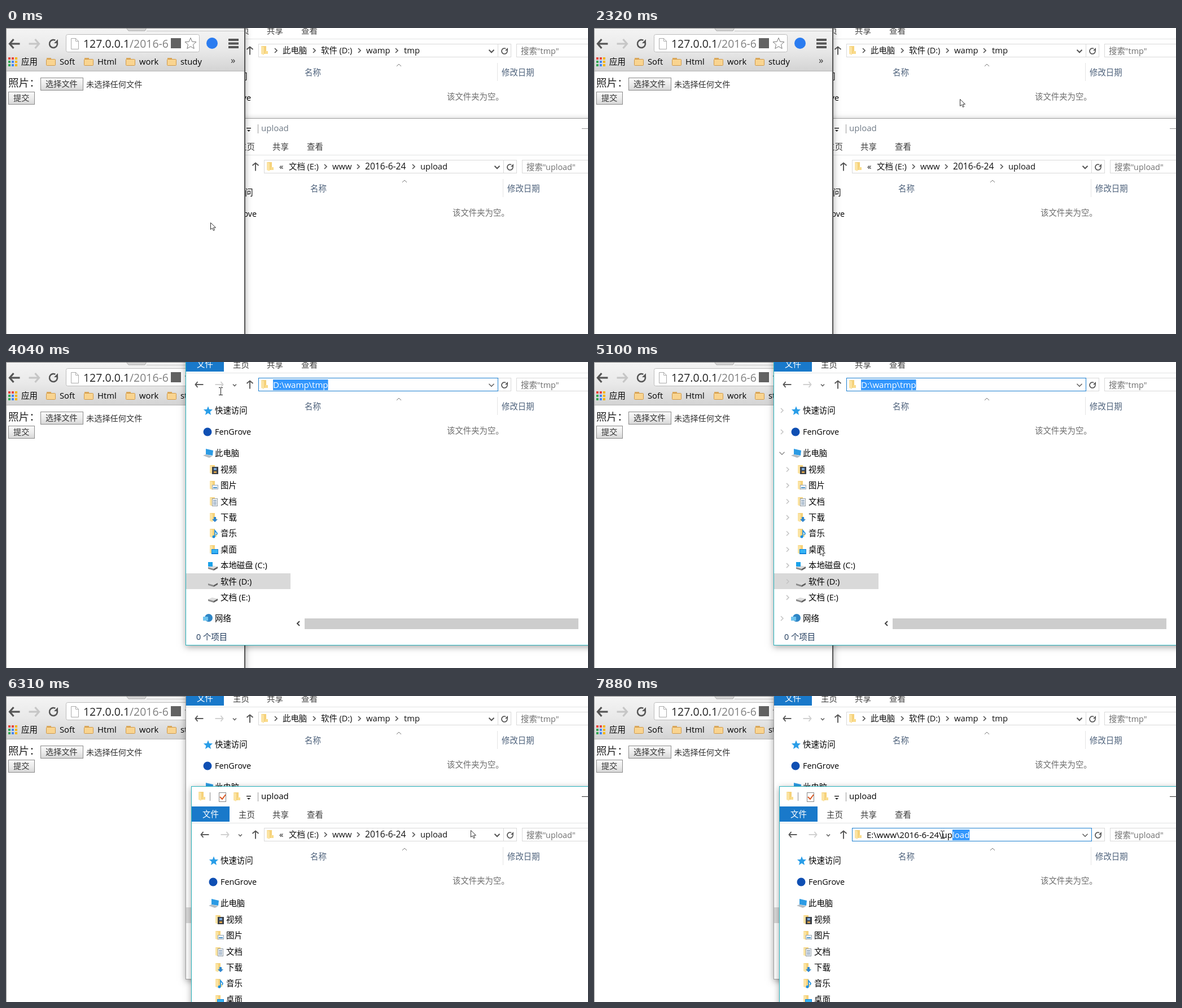
Write an HTML page with a canvas that moves like this. It is 1031 px wide and 543 px high and loops after 8000 ms.

```html
<!DOCTYPE html>
<html lang="zh">
<head>
<meta charset="utf-8">
<title>Upload folders</title>
<style>
html, body { margin: 0; width: 100%; height: 100%; overflow: hidden; background: #fff; }
canvas { display: block; }
</style>
</head>
<body>
<canvas id="stage" width="1031" height="543"></canvas>
<script>
const c = document.getElementById('stage').getContext('2d');
const LOOP = 8000, STEP = 120;
const FONT = '"Open Sans", "Noto Sans CJK SC", "Noto Sans CJK", sans-serif';

// Pointer moves: start time, number of steps, end x, end y
const MOVES = [
  [120, 6, 308, 214], [840, 1, 304, 246], [990, 3, 449, 190], [1350, 2, 362, 155],
  [1630, 1, 645, 198], [1780, 2, 685, 159], [2050, 1, 620, 110], [2200, 2, 648, 126],
  [2720, 2, 753, 40], [2980, 1, 758, 30], [3100, 1, 767, 34], [3250, 1, 785, 38],
  [3680, 4, 380, 52], [4590, 4, 281, 120], [5100, 1, 400, 330], [5260, 1, 537, 452],
  [5410, 2, 612, 526], [5650, 2, 636, 428], [5920, 2, 731, 226], [6190, 2, 823, 238],
  [6580, 1, 821, 245], [6950, 1, 781, 245], [7100, 4, 402, 252], [7610, 2, 676, 247],
  [7880, 1, 617, 246]
];

function pointer(t) {
  let x = 362, y = 345;
  for (const [start, n, ex, ey] of MOVES) {
    if (t < start) break;
    const k = Math.min(n, Math.floor((t - start) / STEP) + 1) / n;
    x += (ex - x) * k;
    y += (ey - y) * k;
  }
  return [Math.round(x), Math.round(y)];
}

function rect(x, y, w, h, fill) {
  c.fillStyle = fill;
  c.fillRect(x, y, w, h);
}
function frame(x, y, w, h, color) {
  c.strokeStyle = color;
  c.lineWidth = 1;
  c.strokeRect(x + .5, y + .5, w - 1, h - 1);
}
function line(points, color, width = 1.5) {
  c.beginPath();
  for (let i = 0; i < points.length; i += 2) c.lineTo(points[i], points[i + 1]);
  c.strokeStyle = color;
  c.lineWidth = width;
  c.stroke();
}
function poly(points, fill, stroke) {
  c.beginPath();
  for (let i = 0; i < points.length; i += 2) c.lineTo(points[i], points[i + 1]);
  c.closePath();
  if (fill) { c.fillStyle = fill; c.fill(); }
  if (stroke) { c.strokeStyle = stroke; c.lineWidth = 1; c.stroke(); }
}
function dot(x, y, r, fill) {
  c.beginPath();
  c.arc(x, y, r, 0, 7);
  c.fillStyle = fill;
  c.fill();
}
function setFont(size, weight = 400) { c.font = `${weight} ${size}px ${FONT}`; }
// y is the middle of the line
function text(s, x, y, color = '#000', size, weight) {
  setFont(size || (/[\u4e00-\u9fff]/.test(s) ? 14.4 : 14.8), weight);
  c.fillStyle = color;
  c.fillText(s, x, y + 5);
}
function chevron(x, y, dir, size, color, width = 1.5) {
  c.save();
  c.translate(x, y);
  c.rotate({ right: 0, down: 1, left: 2, up: 3 }[dir] * Math.PI / 2);
  line([-size / 2, -size, size / 2, 0, -size / 2, size], color, width);
  c.restore();
}
function arrow(x, y, len, head, color, width, turn = 0) {
  c.save();
  c.translate(x, y);
  c.rotate(turn);
  line([-len / 2 + 1, 0, len / 2, 0], color, width);
  line([head - len / 2, -head, -len / 2 + 1, 0, head - len / 2, head], color, width);
  c.restore();
}
function star(x, y, r, fill, stroke) {
  const p = [];
  for (let i = 0; i < 10; i++) {
    const a = i * Math.PI / 5, q = i % 2 ? r * .45 : r;
    p.push(x + q * Math.sin(a), y - q * Math.cos(a));
  }
  poly(p, fill, stroke);
}
function reload(x, y, r, color, width) {
  c.beginPath();
  c.arc(x, y, r, -.2, 5.2);
  c.strokeStyle = color;
  c.lineWidth = width;
  c.stroke();
  poly([x + r + 1, y - r - 1, x + r + 1, y - 1, x + 1, y - 1], color);
}
function folder(x, y) {
  rect(x, y, 9, 14, '#f6d27a');
  poly([x, y, x + 5, y + 2, x + 5, y + 16, x, y + 14], '#fbe3a2');
  rect(x + 7, y + 9, 5, 5, '#f9dc8d');
}
function bookmark(x) {
  rect(x + 1, 53, 8, 4, '#dba95c');
  c.beginPath();
  c.roundRect(x + .5, 55.5, 16, 11, 1);
  c.fillStyle = '#f9d490';
  c.fill();
  c.strokeStyle = '#cf9a4c';
  c.lineWidth = 1;
  c.stroke();
}
function vertical(y0, y1, ...stops) {
  const g = c.createLinearGradient(0, y0, 0, y1);
  stops.forEach((s, i) => g.addColorStop(i / (stops.length - 1), s));
  return g;
}
function panel(x, y, w, h, border) {
  c.save();
  c.shadowColor = 'rgba(0,0,0,.35)';
  c.shadowBlur = 11;
  c.shadowOffsetY = 3;
  rect(x, y, w, h, '#fff');
  c.restore();
  frame(x, y, w, h, border);
}

function button(s, x, y, w) {
  rect(x, y, w, 23, vertical(y, y + 23, '#fafafa', '#ececec', '#d6d6d6'));
  frame(x, y, w, 23, '#8c8c8c');
  text(s, x + 9, y + 11, '#333', 14.2, 300);
}

function browser() {
  panel(-2, -2, 426, 560, '#505050');
  rect(422, 0, 2, 543, '#555');
  rect(0, 0, 422, 77, vertical(0, 77, '#f4f4f4', '#e9e9e9', '#d3d3d3'));
  poly([213, 0, 217, 5, 246, 5, 249, 0], '#d5d5d5', '#aaa');
  rect(249, 5, 173, 1, '#c8c8c8');
  rect(0, 0, 422, 1, '#858585');
  rect(0, 76, 422, 1, '#b4b4b4');
  rect(0, 0, 1, 543, '#999');

  arrow(15, 28, 19, 8, '#555', 3.2);
  arrow(50, 28, 19, 8, '#c6c6c6', 3.2, Math.PI);
  reload(84, 28, 7, '#555', 2.6);
  c.beginPath();
  c.roundRect(106.5, 11.5, 236, 31, 3);
  c.fillStyle = '#fff';
  c.fill();
  c.strokeStyle = '#bcbcbc';
  c.lineWidth = 1;
  c.stroke();
  poly([115.5, 18.5, 123.5, 18.5, 128.5, 23.5, 128.5, 37.5, 115.5, 37.5], '#fff', '#aaa');
  line([123.5, 18, 123.5, 23.5, 129, 23.5], '#aaa', 1);
  c.save();
  c.beginPath();
  c.rect(130, 12, 159, 30);
  c.clip();
  text('127.0.0.1', 137, 29.5, '#222', 19.4);
  const hostWidth = c.measureText('127.0.0.1').width;
  text('/2016-6', 137 + hostWidth, 29.5, '#808080', 19.4);
  c.restore();
  rect(292, 18, 18, 18, '#626262');
  star(327, 28, 10.5, '#fff', '#777');
  dot(365, 27, 10, '#2b7cf0');
  for (const y of [19, 25.5, 32]) rect(394, y, 18, 4, '#555');

  const hues = ['#e8453c', '#e8453c', '#f5b400', '#34a853', '#4285f4', '#f5b400', '#34a853', '#4285f4', '#f5b400'];
  hues.forEach((h, i) => rect(4 + i % 3 * 6, 52 + Math.floor(i / 3) * 6, 4, 4, h));
  text('应用', 27, 60);
  [['Soft', 71], ['Html', 138], ['work', 212], ['study', 285]].forEach(([s, x]) => {
    bookmark(x);
    text(s, x + 24, 60);
  });
  text('»', 398, 58, '#333', 17);

  text('照片：', 4, 99, '#222', 18.6, 300);
  button('选择文件', 61, 88, 76);
  text('未选择任何文件', 142, 99.5, '#333', 14.2, 300);
  button('提交', 4, 113, 47);
}

// Overlay on a library folder, by row
const BADGES = [
  (x, y) => { rect(x, y - 5, 11, 13, '#3c4148'); rect(x + 3, y - 3, 5, 4, '#7aa7d8'); rect(x + 3, y + 3, 5, 3, '#d6a04b'); },
  (x, y) => { rect(x, y - 1, 11, 8, '#eef5fb'); frame(x, y - 1, 11, 8, '#9aa7b2'); rect(x + 2, y + 3, 7, 2, '#4f94c9'); },
  (x, y) => { rect(x, y - 6, 10, 14, '#fff'); frame(x, y - 6, 10, 14, '#8f9aa3'); for (let i = 0; i < 4; i++) rect(x + 2, y - 3 + i * 2.5, 6, 1, '#55779b'); },
  (x, y) => poly([x + 3, y - 1, x + 7, y - 1, x + 7, y + 3, x + 10, y + 3, x + 5, y + 8, x, y + 3, x + 3, y + 3], '#2f86d1'),
  (x, y) => { dot(x + 3, y + 6, 2.5, '#1d8fe0'); line([x + 5, y + 6, x + 5, y - 5, x + 9, y, x + 8, y + 3], '#1d8fe0', 1.7); },
  (x, y) => { rect(x - 1, y - 1, 12, 9, '#1283d8'); rect(x, y, 10, 6, '#35b4f5'); }
];

function drive(y) {
  poly([358, y + 3, 365, y, 375, y + 2, 368, y + 6], '#dcdcdc');
  poly([358, y + 3, 368, y + 6, 368, y + 9, 358, y + 6], '#8b8b8b');
  poly([368, y + 6, 375, y + 2, 375, y + 5, 368, y + 9], '#5c5c5c');
}

function tree(win, open) {
  if (!win.upload) rect(319, 375, 185, 28, '#d9d9d9');
  star(358, 87, 8.5, '#2a9ee8');
  dot(357, 124, 7.5, '#0f4fb3');
  poly([354, 154, 367, 157, 366, 166, 354, 164], '#2c9be4');
  poly([349, 166, 354, 164, 366, 167, 360, 170], '#b5bcc2');
  dot(359, 454, 7, '#2f86c6');
  rect(349, 452, 9, 7, '#6fc4ef');
  text('快速访问', 370, 86);
  text('FenGrove', 370, 124, '#000', 14.4);
  text('此电脑', 370, 162);
  text('网络', 370, 455);
  const names = ['视频', '图片', '文档', '下载', '音乐', '桌面', '本地磁盘 (C:)', '软件 (D:)', '文档 (E:)'];
  names.forEach((s, i) => {
    const y = 190.7 + 28.4 * i, iy = Math.round(y);
    if (i < 6) {
      folder(361, iy - 8);
      BADGES[i](365, iy);
    } else drive(iy);
    text(s, 380, y);
    if (open) chevron(343, y, 'right', 4, '#c4c4c4');
  });
  rect(358, 355, 8, 8, '#1aa2ea');
  if (open) {
    for (const y of [86, 124, 455]) chevron(333, y, 'right', 4, '#c4c4c4');
    chevron(333, 162, 'down', 4.5, '#8f8f8f');
  }
}

function address(win) {
  const border = win.edit ? '#1c7fd0' : win.hover ? '#7eb4ea' : '#d9d9d9';
  frame(871, 28, 24, 24, '#d9d9d9');
  frame(447, 28, 425, 24, border);
  folder(452, 32);
  if (win.edit) {
    const size = 15, x = 473, s = win.path;
    setFont(size);
    const width = n => c.measureText(s.slice(0, n)).width;
    let from = 0;
    if (win.keep) from = s.length - win.keep;
    else while (from < s.length && x + (width(from) + width(from + 1)) / 2 < win.selX) from++;
    text(s.slice(0, from), x, 40.5, '#000', size);
    const left = x + width(from);
    if (from < s.length) rect(left, 31, width(s.length) - width(from), 19, '#3397fd');
    text(s.slice(from), left, 40.5, '#fff', size);
  } else {
    win.crumbs.forEach(([s, cx]) => text(s, cx, 40, '#111', /^\d/.test(s) ? 15.6 : 0));
    win.marks.forEach(mx => chevron(mx, 40, 'right', 4, '#555', 1.7));
  }
  chevron(860, 41, 'down', 4.5, '#555', win.edit ? 1.3 : 2);
  reload(883, 41, 5, '#555', 1.7);
}

function explorer(win) {
  c.save();
  c.translate(win.dx, win.dy);
  panel(318, -46, 760, 549, win.active ? '#27b3bd' : '#a0a0a0');

  folder(331, -36);
  rect(351, -35, 1, 15, '#8a8a8a');
  rect(367, -35, 13, 16, '#fff');
  frame(367, -35, 13, 17, '#888');
  line([369, -27, 373, -23, 379, -31], '#d9541e', 2);
  folder(393, -35);
  rect(416, -29, 8, 1.5, '#222');
  poly([417, -25, 423, -25, 420, -22], '#222');
  rect(436, -35, 1, 16, '#999');
  text(win.name, 442, -28, win.active ? '#000' : '#6f7a86', 15);
  rect(1010, -28, 30, 1, win.active ? '#333' : '#999');

  rect(319, -10, 67, 27, '#1979ca');
  text('文件', 338, 4, '#fff');
  [['主页', 402], ['共享', 462], ['查看', 523]].forEach(([s, x]) => text(s, x, 4.5, '#3a3a3a'));
  rect(319, 19, 760, 1, '#e2e3e4');

  arrow(342, 40, 15, 5, '#555', 1.9);
  arrow(378, 40, 15, 5, '#cfcfcf', 1.9, Math.PI);
  chevron(405, 41, 'down', 3, '#666', 1.6);
  arrow(432, 40, 15, 5.5, '#555', 1.9, Math.PI / 2);
  address(win);
  frame(904, 28, 200, 24, '#d9d9d9');
  text(`搜索"${win.name}"`, 912, 40.5, '#707070');

  text('名称', 529, 78.5, '#4c607a');
  text('修改日期', 878, 78.5, '#4c607a');
  chevron(696, 66, 'up', 4, '#777', 1);
  rect(870, 62, 1, 32, '#e4e4e4');
  text('该文件夹为空。', 781, 122, '#6d6d6d');
  tree(win, win.open);
  chevron(518, 464, 'left', 4, '#444', 2);
  rect(529, 455, 485, 19, win.scroll ? '#b9b9b9' : '#cdcdcd');
  text('0 个项目', 337, 488, '#1e395b');
  c.restore();
}

function cursor(x, y, beam) {
  if (beam) {
    const ink = '#222';
    rect(x, y - 6, 1, 13, ink);
    for (const e of [-7, 6]) {
      rect(x - 3, y + e, 3, 1, ink);
      rect(x + 1, y + e, 3, 1, ink);
    }
  } else {
    const p = [0, 0, 0, 12, 3, 9.5, 5, 14, 7, 13, 5, 8.7, 9, 8.7];
    poly(p.map((v, i) => v + .5 + (i % 2 ? y : x)), '#fff', '#333');
  }
}

function draw(t) {
  const [x, y] = pointer(t);
  const tmpUp = t >= 2600, uploadUp = t >= 5650;
  const tmp = {
    dx: 0, dy: 0, name: 'tmp', path: 'D:\\wamp\\tmp',
    active: tmpUp && !uploadUp,
    hover: t >= 2980 && t < 3100,
    edit: t >= 3100 && !uploadUp,
    selX: t < 3400 || t > 4040 ? 0 : t < 3680 ? 999 : x,
    open: t >= 4710 && !uploadUp,
    scroll: t >= 5260 && !uploadUp,
    crumbs: [['此电脑', 490], ['软件 (D:)', 558], ['wamp', 638], ['tmp', 705]],
    marks: [478, 546, 626, 692]
  };
  const upload = {
    dx: 10, dy: 206, name: 'upload', path: 'E:\\www\\2016-6-24\\upload', upload: true,
    active: uploadUp,
    hover: t >= 6460 && t < 6580,
    edit: t >= 6580,
    selX: t < 6830 ? 0 : t < 7100 ? 999 : x - 10,
    keep: t >= 7880 ? 4 : 0,
    crumbs: [['«', 474], ['文档 (E:)', 491], ['www', 568], ['2016-6-24', 626], ['upload', 724]],
    marks: [556, 614, 712]
  };
  rect(0, 0, 1031, 543, '#fff');
  if (!tmpUp) explorer(tmp);
  if (!uploadUp) explorer(upload);
  browser();
  if (tmpUp) explorer(tmp);
  if (uploadUp) explorer(upload);
  cursor(x, y, (t >= 3100 && t < 4590) || t >= 6580);
}

let begin;
function tick(now) {
  begin ??= now;
  draw((now - begin) % LOOP);
  requestAnimationFrame(tick);
}
requestAnimationFrame(tick);
</script>
</body>
</html>
```
